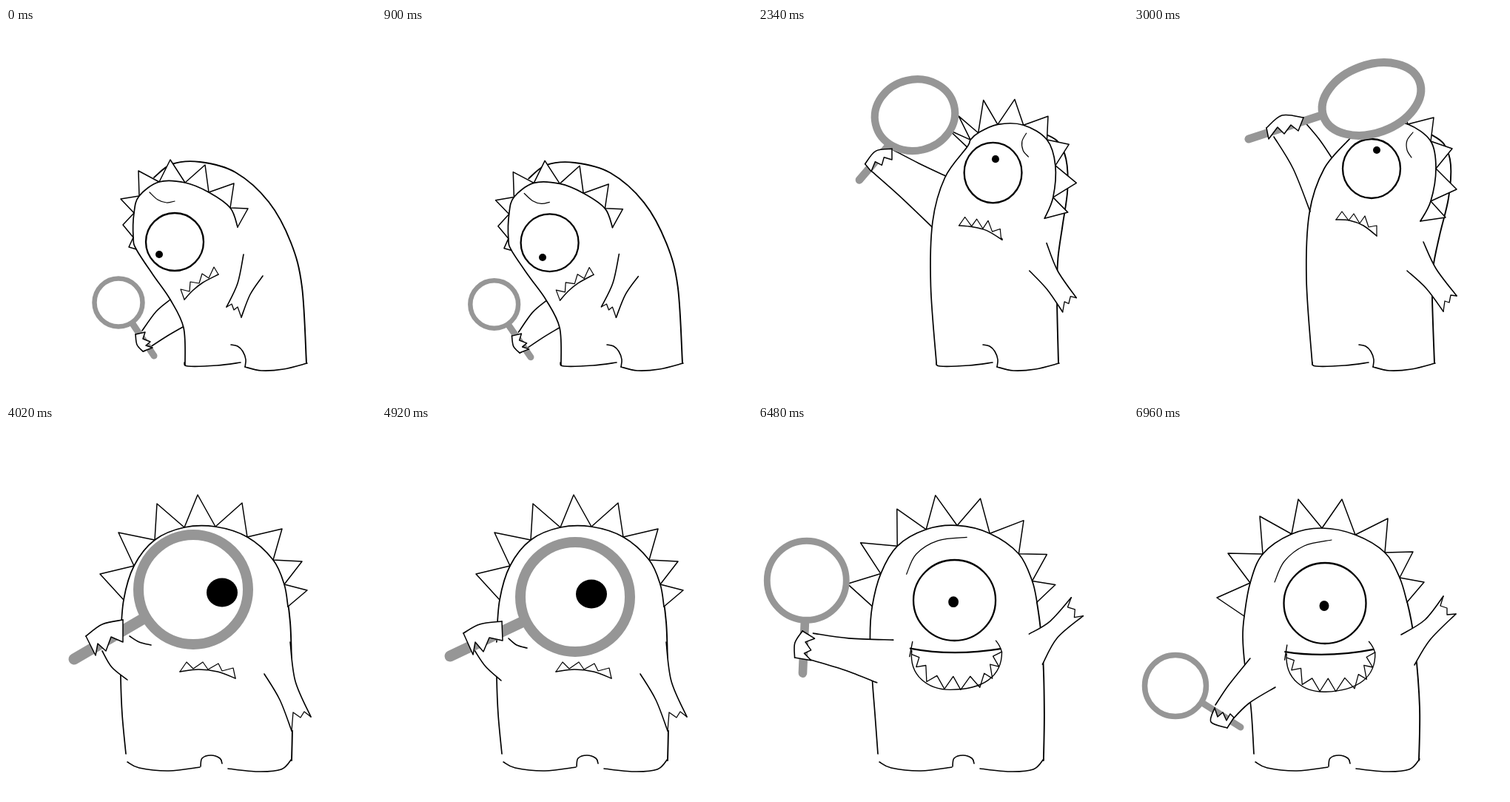
These frames come from a looping animation (500 by 500 pixels, 8000 ms). An HTML page with a canvas:

```html
<!DOCTYPE html>
<html>
<head>
<meta charset="utf-8">
<style>
html, body { margin: 0; width: 100%; height: 100%; overflow: hidden; background: #fff; }
canvas { display: block; }
</style>
</head>
<body>
<canvas id="stage" width="500" height="500"></canvas>
<script>
const ctx = document.getElementById('stage').getContext('2d');
const LOOP = 8000, STEP = 60;

// Pose parts are flat x,y lists, except:
// eye and pupil [x, y, rx, ry], lens [x, y, rx, ry, angle, ring, handleX, handleY, handleWidth],
// grin [x, y, scaleX, scaleY, angle].
const sideFeet = {
  sole: [241,452, 246,457, 285,456, 317,452],
  notch: [304,428, 313,430, 320,437, 324,448, 323,458],
  heel: [323,458, 345,463, 375,461, 407,453]
};
const frontFeet = {
  sole: [164,454, 180,462, 220,466, 262,461],
  notch: [263,460, 265,449, 277,445, 289,449, 292,456],
  heel: [300,463, 340,467, 372,464, 386,450]
};

const crouch = {
  ...sideFeet,
  low: [242,456, 240,405, 222,367, 199,334],
  spikes: [176,299, 166,296, 172,283, 158,266, 173,250, 155,231, 180,227, 179,193, 207,208,
    222,178, 242,209, 269,185, 274,222, 308,210, 303,243, 327,244, 313,269],
  back: [200,202, 224,184, 262,181, 310,195, 355,235, 385,290, 400,350, 406,453],
  eye: [228,289,39,39], pupil: [207,306,5,5],
  brow: [194,222, 205,232, 217,236, 228,234],
  teeth: [241,367, 236,353, 248,356, 249,343, 261,345, 265,332, 274,338, 281,323, 287,333, 287,333, 287,333],
  lip: [241,367, 252,355, 266,344, 287,333],
  armIn: [321,306, 313,345, 298,377], armOut: [347,335, 330,360, 318,391],
  claws: [298,377, 305,373, 308,381, 313,377, 318,391],
  upper: [222,367, 203,383, 184,409], under: [239,404, 215,418, 186,437],
  fist: [175,414, 177,428, 185,437],
  grip: [175,414, 188,411, 185,420, 195,424, 189,429, 198,432, 185,437],
  lens: [152,371,32.5,32.5,0,6.5, 200,443,9],
  grin: [273,322,.6,.5,0]
};

const rise = {
  ...sideFeet,
  low: [243,455, 236,400, 230,330, 228,270],
  spikes: [229,228, 217,213, 231,203, 216,182, 239,174, 229,140, 261,149, 267,116, 295,138,
    318,109, 331,140, 365,124, 367,163, 398,160, 386,200, 406,210, 389,236],
  back: [290,133, 320,127, 350,133, 380,158, 403,195, 413,235, 409,330, 406,453],
  eye: [298,227,38.5,45], pupil: [281,246,5,5.5],
  brow: [281,149, 288,160, 297,168, 311,169],
  teeth: [264,312, 272,298, 281,312, 288,299, 297,311, 305,296, 314,310, 323,297, 332,311, 340,302, 341,316],
  lip: [264,312, 275,317, 303,311, 341,316],
  armIn: [354,328, 366,360, 376,388], armOut: [384,300, 387,345, 397,379],
  claws: [376,388, 381,375, 385,381, 390,372, 397,379],
  upper: [228,291, 195,301, 160,306], under: [230,341, 190,339, 143,340],
  fist: [152,307, 144,322, 143,340],
  grip: [152,307, 166,315, 154,321, 163,329, 154,333, 162,340, 143,340],
  lens: [167,244,37.5,46,0,8.5, 152,358,10],
  grin: crouch.grin
};

const lookUp = {
  ...sideFeet,
  low: [241,455, 233,340, 237,250, 257,190],
  spikes: [292,149, 266,125, 297,142, 281,108, 308,136, 318,90, 335,127, 361,93, 370,130,
    405,121, 401,153, 430,163, 408,190, 436,218, 401,234, 421,256, 387,261],
  back: [400,143, 419,157, 428,185, 425,230, 413,280, 404,325, 403,365, 406,453],
  eye: [321,190,39,40], pupil: [328,165,5,5],
  brow: [377,141, 369,152, 369,165, 375,175],
  teeth: [273,259, 281,248, 290,260, 297,251, 305,264, 312,254, 317,269, 328,267, 328,281, 328,281, 328,281],
  lip: [273,259, 291,260, 310,267, 328,281],
  armIn: [369,328, 395,352, 418,383], armOut: [391,289, 408,325, 436,362],
  claws: [418,383, 420,369, 426,371, 428,361, 436,362],
  upper: [267,175, 250,150, 228,124], under: [238,248, 215,190, 189,147],
  fist: [229,121, 200,118, 179,135],
  grip: [229,121, 222,139, 212,131, 203,143, 194,134, 182,150, 179,135],
  lens: [321,96,69,46,-20,11, 155,150,11],
  grin: crouch.grin
};

const peer = {
  ...frontFeet,
  low: [162,443, 157,390, 155,340, 155,290],
  spikes: [159,235, 127,200, 173,189, 152,144, 201,154, 204,105, 241,137, 259,93, 283,136,
    319,104, 326,150, 373,139, 361,181, 400,183, 376,214, 407,222, 381,244],
  back: [283,136, 326,150, 361,181, 376,214, 384,265, 386,330, 387,400, 386,452],
  eye: [258,232,54,54], pupil: [292,225,21,19.5],
  brow: [215,200, 225,182, 243,170, 268,168],
  teeth: [235,332, 244,319, 253,328, 266,319, 273,329, 287,321, 292,331, 307,327, 310,341, 310,341, 310,341],
  lip: [235,332, 260,329, 286,332, 310,341],
  armIn: [349,335, 370,370, 386,412], armOut: [384,292, 391,345, 412,393],
  claws: [386,412, 388,387, 398,394, 403,386, 412,393],
  upper: [196,296, 180,292, 167,284], under: [164,343, 143,326, 130,304],
  fist: [158,262, 130,268, 108,284],
  grip: [158,262, 158,292, 142,285, 135,304, 124,294, 121,310, 108,284],
  lens: [253,221,74,74,0,14, 92,315,15],
  grin: crouch.grin
};

const cheer = {
  ...frontFeet,
  low: [162,443, 158,390, 155,345, 152,285],
  spikes: [155,242, 122,211, 167,198, 140,156, 190,161, 190,111, 229,139, 242,93, 271,134,
    303,98, 315,145, 361,128, 354,173, 392,174, 372,210, 403,215, 378,238],
  back: [271,134, 315,145, 354,173, 372,210, 381,260, 386,320, 387,390, 386,452],
  eye: [266.5,235,55.5,54.5], pupil: [265,237,7,7.5],
  brow: [202,199, 215,172, 245,154, 284,150],
  teeth: peer.teeth, lip: peer.lip,
  armIn: [385,322, 405,286, 440,257], armOut: [367,281, 395,264, 424,232],
  claws: [440,257, 428,259, 429,248, 419,245, 424,232],
  upper: [188,284, 130,272, 90,258], under: [158,346, 120,318, 82,295],
  fist: [74,254, 63,270, 60,291],
  grip: [74,254, 92,264, 77,270, 85,281, 74,287, 84,297, 60,291],
  lens: [98,180,55,55,0,9, 69,315,12],
  grin: [268,303,1,1,0]
};

const rest = {
  ...cheer,
  low: [162,443, 158,380, 150,325, 147,285],
  spikes: [149,257, 112,232, 157,212, 127,172, 174,173, 170,122, 213,146, 222,99, 254,138,
    281,99, 299,147, 343,125, 339,171, 377,170, 359,205, 392,211, 369,238],
  back: [254,138, 299,147, 339,171, 359,205, 372,250, 380,300, 386,380, 385,452],
  eye: [258,239.5,55.5,54.5], pupil: [257,243,6.5,7],
  brow: [190,211, 203,183, 230,162, 267,154],
  armIn: [379,323, 400,289, 435,254], armOut: [361,282, 393,262, 418,230],
  claws: [435,254, 423,255, 423,246, 414,243, 418,230],
  upper: [157,314, 128,350, 110,377], under: [191,353, 155,375, 130,400],
  fist: [109,381, 104,400, 126,408],
  grip: [109,381, 113,393, 120,387, 125,398, 130,389, 135,394, 126,408],
  lens: [56,351,41.5,41.5,0,7.5, 144,407,9],
  grin: [265,306,.98,1,-2]
};

const shift = (list, dx, dy) => list.map((v, i) => v + (i % 2 ? dy : dx));
const mix = (a, b, k) => Object.fromEntries(Object.keys(a).map(
  part => [part, a[part].map((v, i) => v + (b[part][i] - v) * k)]));

const glance = { ...crouch, pupil: [217,310,5,5] };
const dip = mix(glance, { ...rise, pupil: glance.pupil }, -.04);
const turn = {
  ...mix(rise, lookUp, .85),
  upper: [245,220, 195,228, 149,231], under: [234,283, 185,272, 132,265],
  fist: shift(rise.fist, -11, -75), grip: shift(rise.grip, -11, -75),
  lens: [156,169,37.5,46,0,8.5, 141,280,10]
};
const raise = {
  ...turn,
  upper: [258,190, 228,160, 200,132], under: [236,262, 195,205, 161,155],
  fist: shift(lookUp.fist, -28, 8), grip: shift(lookUp.grip, -28, 8),
  lens: [240,92,63,49,-20,11, 135,168,11]
};
const adjust = {
  ...peer,
  upper: [196,300, 182,296, 171,287], under: [161,344, 140,325, 125,303],
  fist: [162,264, 132,268, 110,280],
  grip: [162,264, 163,290, 145,286, 137,305, 126,292, 123,309, 110,280],
  lens: [261,231,74,74,0,14, 92,311,15]
};
const peek = { ...adjust, pupil: [283,227,21,19.5] };
const smile = {
  ...peek, pupil: [255,231,21,19.5],
  teeth: [236,322, 245,330, 250,340, 258,332, 265,347, 273,334, 282,347, 290,332, 299,339, 302,328, 311,322],
  lip: [236,322, 256,345, 290,345, 311,322]
};
const wave = {
  ...cheer,
  upper: [186,286, 122,279, 70,268], under: [157,346, 112,324, 62,305],
  fist: shift(cheer.fist, -20, 10), grip: shift(cheer.grip, -20, 10),
  lens: [67,191,55,55,0,9, 50,325,12]
};

// [first changed step, last step, pose reached]
const moves = [
  [360, 360, glance], [840, 1020, dip], [1380, 1500, rise], [1560, 1620, turn],
  [2280, 2400, raise], [2760, 3000, lookUp], [3600, 4020, peer], [4500, 4680, adjust],
  [4920, 4920, peek], [4980, 5160, smile], [5520, 5700, cheer], [5760, 5940, wave],
  [6480, 6960, rest]
];

function poseAt(t) {
  let pose = crouch;
  for (const [start, end, next] of moves) {
    if (t < start) break;
    pose = mix(pose, next, Math.min(1, (t - start + STEP) / (end - start + STEP)));
  }
  return pose;
}

function poly(p, path = new Path2D()) {
  for (let i = 0; i < p.length; i += 2) path.lineTo(p[i], p[i + 1]);
  return path;
}

// Smooth curve through all points
function curve(p, path = new Path2D()) {
  const at = (i, c) => p[Math.max(0, Math.min(p.length / 2 - 1, i)) * 2 + c];
  path.lineTo(p[0], p[1]);
  for (let i = 0; i < p.length / 2 - 1; i++) {
    const c = [0, 1].map(j => at(i, j) + (at(i + 1, j) - at(i - 1, j)) / 6);
    const d = [0, 1].map(j => at(i + 1, j) - (at(i + 2, j) - at(i, j)) / 6);
    path.bezierCurveTo(...c, ...d, at(i + 1, 0), at(i + 1, 1));
  }
  return path;
}

function oval(x, y, rx, ry, deg = 0) {
  const path = new Path2D();
  path.ellipse(x, y, rx, ry, deg * Math.PI / 180, 0, 7);
  return path;
}

function ink(path, width = 1.6, color = '#000') {
  ctx.lineWidth = width;
  ctx.strokeStyle = color;
  ctx.stroke(path);
}

function fill(path, color = '#fff') {
  ctx.fillStyle = color;
  ctx.fill(path);
}

const reverse = p => p.map((_, i) => p[p.length - 2 - i + 2 * (i % 2)]);

function limb(a, b) {
  fill(curve(reverse(b), curve(a)));
  ink(curve(a));
  ink(curve(b));
}

const grinLip = new Path2D('M-62,-3Q-5,8 60,-2');
const grinEdge = new Path2D('M-59,-12L-63,8M54,-13Q60,-6 62,3M-60,0C-64,34-38,53-8,53C36,53 62,36 62,2');
const grinTeeth = poly([-60,5, -50,9, -54,22, -41,20, -40,42, -26,34, -16,52, -4,35, 6,53,
  19,35, 32,50, 38,31, 49,38, 46,19, 58,22, 50,8, 62,2]);

function drawGrin([x, y, sx, sy, deg]) {
  ctx.save();
  ctx.translate(x, y);
  ctx.rotate(deg * Math.PI / 180);
  ctx.scale(sx, sy);
  ink(grinLip, 2.2);
  ink(grinEdge, 1.4);
  ink(grinTeeth, 1.3);
  ctx.restore();
}

function drawLens([x, y, rx, ry, deg, ring, hx, hy, width]) {
  const gray = '#969696', rim = oval(x, y, rx, ry, deg);
  ink(poly([x, y, hx, hy]), width, gray);
  fill(rim);
  ink(rim, ring, gray);
}

function draw(t) {
  const p = poseAt(t), armInFront = t >= 3840;
  const bases = p.spikes.filter((_, i) => i % 4 < 2);
  ctx.clearRect(0, 0, 500, 500);
  ctx.lineCap = ctx.lineJoin = 'round';

  ink(curve(p.back), 1.9);
  if (!armInFront) limb(p.upper, p.under);
  fill(poly(p.spikes));
  ink(poly(p.spikes), 1.5);
  ink(curve([...p.low, ...bases]), 1.7);
  for (const part of ['sole', 'notch', 'heel']) ink(curve(p[part]));

  ink(oval(...p.eye), 2.3);
  ink(curve(p.brow), 1.2);
  if (t >= 5520) drawGrin(p.grin);
  else {
    ink(poly(p.teeth), 1.2);
    ink(curve(p.lip), 1.5);
  }

  limb(p.armIn, p.armOut);
  ink(poly(p.claws), 1.3);
  if (armInFront) limb(p.upper, p.under);
  drawLens(p.lens);
  fill(poly(reverse(p.grip), curve(p.fist)));
  ink(curve(p.fist));
  ink(poly(p.grip), 1.5);
  fill(oval(...p.pupil), '#000');
}

function tick(now) {
  draw(Math.floor(now % LOOP / STEP) * STEP);
  requestAnimationFrame(tick);
}
requestAnimationFrame(tick);
</script>
</body>
</html>
```
